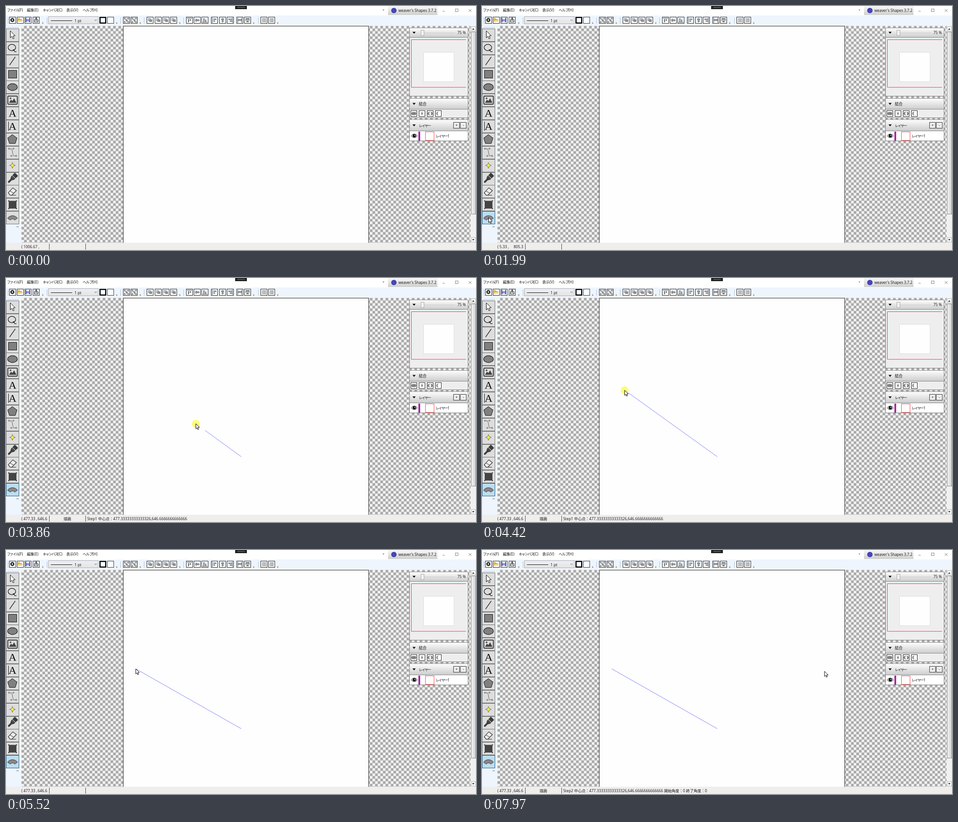
An HTML page with a canvas that plays this animation: 1036x540 px, repeating every 8000 ms.

```html
<!DOCTYPE html>
<html lang="ja">
<head>
<meta charset="utf-8">
<style>
html, body { margin: 0; width: 100%; height: 100%; overflow: hidden; background: #fff; }
canvas { display: block; }
</style>
</head>
<body>
<canvas id="stage" width="1036" height="540"></canvas>
<script>
const LOOP = 8000, STEP = 70;
const SANS = '"Open Sans", "Noto Sans CJK JP", sans-serif';
const stage = document.getElementById('stage').getContext('2d');
const backdrop = document.createElement('canvas');
backdrop.width = 1036;
backdrop.height = 540;
let g = backdrop.getContext('2d');

// Pointer strokes as [time, x, y]
const MOVES = [
  [[290, 906, 522], [430, 740, 506], [640, 415, 490], [780, 260.5, 479], [920, 70, 458], [990, 20, 452], [1050, 11, 468]],
  [[1120, 12, 468], [1260, 14.5, 468]],
  [[1990, 14.5, 468], [2200, 100, 460], [2480, 400, 418], [2620, 510, 398], [2770, 545, 392]],
  [[2900, 541, 393], [3110, 523, 394], [3250, 519, 394], [3440, 516, 394], [3510, 515, 393], [3580, 503, 384], [3650, 481, 368]],
  [[3720, 459, 352], [4000, 378, 293], [4210, 340, 267], [4350, 321, 253], [4420, 314.5, 248.5], [4490, 308.5, 250.5]],
  [[4570, 305, 252], [4850, 293, 259], [4920, 289, 261.5], [5130, 286, 263], [5260, 286, 263]],
  [[6310, 292, 258], [6450, 320, 233], [6590, 352, 205.5], [6800, 373, 187], [7080, 380, 182.5]],
  [[7410, 386, 178], [7550, 450, 140], [7620, 510, 131], [7760, 650, 172], [7900, 742, 246], [7970, 755, 268.5]]
];

function box(x, y, w, h, fill, stroke, width = 1) {
  if (fill) { g.fillStyle = fill; g.fillRect(x, y, w, h); }
  if (stroke) {
    g.strokeStyle = stroke;
    g.lineWidth = width;
    g.strokeRect(x + width / 2, y + width / 2, w - width, h - width);
  }
}

function paint(fill, stroke, width = 1) {
  if (fill) { g.fillStyle = fill; g.fill(); }
  if (stroke) { g.strokeStyle = stroke; g.lineWidth = width; g.stroke(); }
}

function poly(points, fill, stroke, width) {
  g.beginPath();
  points.forEach(([x, y]) => g.lineTo(x, y));
  g.closePath();
  paint(fill, stroke, width);
}

function line(x1, y1, x2, y2, color = '#000', width = 1) {
  g.beginPath();
  g.moveTo(x1, y1);
  g.lineTo(x2, y2);
  paint(null, color, width);
}

function oval(x, y, rx, ry, fill, stroke, width) {
  g.beginPath();
  g.ellipse(x, y, rx, ry, 0, 0, Math.PI * 2);
  paint(fill, stroke, width);
}

// Returns the advance width so that runs can follow each other.
function text(str, x, y, { size = 8.3, color = '#111', gap = 0, align = 'left', family = SANS } = {}) {
  g.font = `${size}px ${family}`;
  g.letterSpacing = gap + 'px';
  g.textAlign = align;
  g.fillStyle = color;
  g.fillText(str, x, y);
  return g.measureText(str).width;
}

function fade(x1, y1, x2, y2, from, to) {
  const ramp = g.createLinearGradient(x1, y1, x2, y2);
  ramp.addColorStop(0, from);
  ramp.addColorStop(1, to);
  return ramp;
}

function pointer(x, y, scale = 1) {
  const shape = [[0, 0], [0, 11.3], [2.6, 9], [4.3, 13], [6.2, 12.2], [4.5, 8.3], [8, 8]];
  poly(shape.map(([a, b]) => [x + a * scale, y + b * scale]), '#fff', '#000', 1);
}

function polar(cx, cy, radii, count) {
  return Array.from({ length: count }, (_, i) => {
    const a = -Math.PI / 2 + i * 2 * Math.PI / count, r = radii[i % radii.length];
    return [cx + r * Math.cos(a), cy + r * Math.sin(a)];
  });
}

function overflowMark(x) {
  line(x - 1.5, 36.5, x + 1.5, 36.5, '#555', .6);
  poly([[x - 1.5, 38], [x + 1.5, 38], [x, 39.6]], '#333');
}

function grip(x) {
  for (let y = 26; y < 39; y += 2) box(x, y, 1, 1, '#7d8da8');
}

const toolY = i => 64 + 28.87 * i;

function fan(y) {
  const a = -Math.PI * .81, b = -Math.PI * .19;
  g.beginPath();
  g.arc(14.3, y + 9, 13.3, a, b);
  g.arc(14.3, y + 9, 5.8, b, a, true);
  g.closePath();
  paint('#888', '#222', .8);
}

function toolButton(i, fill = '#ddd', edge = '#707070') {
  const y = Math.round(toolY(i) - 14);
  box(0, y, 29, 29, fill, edge);
}

const toolIcons = [
  y => pointer(9.5, y - 9, 1.35),
  y => {
    oval(13, y - 1, 8.3, 7, null, '#111', 1.3);
    g.beginPath();
    g.moveTo(15, y + 4);
    g.quadraticCurveTo(18, y + 3, 18, y + 6);
    g.quadraticCurveTo(18, y + 9, 23, y + 8);
    paint(null, '#111', 1.3);
  },
  y => line(8, y + 9, 20.5, y - 9, '#111', 1.3),
  y => box(5, Math.round(y) - 9, 19, 18, '#808080', '#111'),
  y => oval(14.3, y, 10.8, 7.6, '#808080', '#111', 1.1),
  y => {
    g.beginPath();
    g.roundRect(4, y - 9, 21, 18, 2);
    paint('#ddd', '#444', 2.2);
    poly([[6.5, y + 6], [11, y - 1], [14, y + 2], [18, y - 4], [23, y + 6]], '#444');
    oval(10, y - 4, 1.8, 1.8, '#444');
  },
  y => text('A', 14.3, y + 8, { size: 24, align: 'center', family: '"Liberation Serif", serif' }),
  y => {
    line(5.5, y - 10, 5.5, y + 10, '#111', 1);
    text('A', 14.5, y + 8, { size: 24, align: 'center', family: '"Liberation Serif", serif' });
  },
  y => poly(polar(14, y + .5, [10.8], 5), '#808080', '#111', 1),
  y => {
    g.beginPath();
    g.moveTo(6, y - 8);
    g.bezierCurveTo(21, y - 8, 8, y + 8, 22, y + 8);
    paint(null, '#444', .9);
    line(6, y - 8, 17, y - 8, '#777', .6);
    line(12, y + 8, 22, y + 8, '#777', .6);
    [[5, -9.5], [15, -9.5], [10, 6.5], [21, 6.5]].forEach(([x, dy]) => box(x, y + dy, 3, 3, '#eee', '#444', .7));
  },
  y => poly(polar(14.2, y, [6.5, 2.6], 8), '#ffef4a', '#555', .8),
  y => {
    g.save();
    g.translate(14, y);
    g.rotate(Math.PI / 4);
    box(-5, -13, 10, 8, '#3c3c3c');
    box(-5, -4, 10, 3, '#3c3c3c');
    poly([[-5, -1], [5, -1], [2, 4], [-2, 4]], '#3c3c3c');
    g.beginPath();
    g.roundRect(-2, 2, 4, 11, 2);
    paint('#3c3c3c');
    g.restore();
  },
  y => {
    poly([[5, y + 3], [15, y - 8], [23, y - 2], [13, y + 8], [9, y + 8]], '#eee', '#222', 1.1);
    line(9, y - 1, 17, y + 4, '#222', 1);
    line(9, y + 8.3, 22, y + 8.3, '#222', 1);
  },
  y => {
    box(6, y - 8, 17, 17, '#444');
    [[5, -9], [22, -9], [5, 8], [22, 8]].forEach(([x, dy]) => box(x, y + dy, 2, 2, '#222'));
  },
  fan
];

function barIcon(kind, x, y = 31) {
  const grey = '#777';
  const icons = {
    gear() {
      poly(polar(x, y, [5, 5, 3.6, 3.6], 32), '#111');
      oval(x, y, 1.8, 1.8, '#fff');
    },
    folder() {
      poly([[x - 5, y - 4], [x - 1, y - 4], [x, y - 2], [x + 4, y - 2], [x + 4, y + 4], [x - 5, y + 4]], '#d9a63c');
      poly([[x - 3, y], [x + 6, y], [x + 4, y + 4], [x - 5, y + 4]], '#f7d77b');
    },
    disk() {
      box(x - 5, y - 5, 10, 10, '#5757b5', '#333386', .8);
      box(x - 3, y - 5, 6, 4, '#fff');
      box(x - 3, y + 1, 6, 4, '#c8c8e8');
    },
    share() {
      box(x - 4, y - 1, 9, 6, null, '#111', 1.1);
      line(x + .5, y + 2, x + .5, y - 4, '#111', 1.1);
      poly([[x - 2, y - 3], [x + .5, y - 6], [x + 3, y - 3]], '#111');
    },
    group() {
      box(x - 4, y - 4, 9, 9, null, '#999', .8);
      [[-5, -5], [3, -5], [-5, 3], [3, 3]].forEach(([dx, dy]) => box(x + dx, y + dy, 3, 3, '#fff', '#555', .8));
      box(x - 2, y - 2, 4, 3, '#999');
      box(x, y, 3, 3, grey);
    },
    order() { box(x - 4, y - 4, 6, 6, '#ccc', '#777', .8); box(x - 1, y - 1, 6, 5, '#999', '#666', .8); },
    alignH() { line(x - 5, y - 4, x + 6, y - 4, '#333', 1); box(x - 3, y - 2, 2.5, 7, '#777'); box(x + 1, y - 2, 2.5, 4, '#777'); },
    middleH() { line(x - 5, y + .5, x + 6, y + .5, '#333', .8); box(x - 3, y - 3, 2.5, 7, '#777'); box(x + 1, y - 2, 2.5, 5, '#777'); },
    bottomH() { line(x - 5, y + 5, x + 6, y + 5, '#333', 1); box(x - 3, y - 4, 2.5, 8, '#777'); box(x + 1, y - 1, 2.5, 5, '#777'); },
    alignV() { line(x - 4, y - 5, x - 4, y + 6, '#333', 1); box(x - 2, y - 3, 7, 2.5, '#777'); box(x - 2, y + 1, 4, 2.5, '#777'); },
    middleV() { line(x + .5, y - 5, x + .5, y + 6, '#333', .8); box(x - 3, y - 3, 7, 2.5, '#777'); box(x - 2, y + 1, 5, 2.5, '#777'); },
    rightV() { line(x + 5, y - 5, x + 5, y + 6, '#333', 1); box(x - 4, y - 3, 8, 2.5, '#777'); box(x - 1, y + 1, 5, 2.5, '#777'); },
    spreadH() { line(x - 4, y - 5, x - 4, y + 6, '#333'); line(x + 4.5, y - 5, x + 4.5, y + 6, '#333'); line(x - 4, y, x + 4, y, grey, 3); },
    spreadV() { box(x - 4, y - 4, 9, 3, grey); line(x - 5, y + .5, x + 6, y + .5, '#333', .8); box(x - 2, y + 2, 5, 3, grey); },
    clip() { box(x - 4, y - 4, 9, 9, '#ddd', '#999', .8); box(x - 2, y - 3, 6, 7, '#bbb'); }
  };
  box(x - 7, y - 7, 15, 15, '#fff', '#222');
  icons[kind]();
}

function drawTopBars() {
  box(0, 0, 1036, 21, '#fff');
  box(0, 21, 1036, 23, '#eef5fd');
  box(0, 44, 34, 481, '#eef5fd');
  const menus = [['ファイル', 'F', 2, -1.5], ['編集', 'E', 46, 0], ['キャンバス', 'C', 81, -1.4], ['表示', 'V', 133, 0], ['ヘルプ', 'H', 169, -.8]];
  menus.forEach(([label, key, x, gap]) => {
    const width = text(label, x, 11.5, { size: 8, gap });
    text(`(${key})`, x + width, 11.5, { size: 8.3 });
  });

  box(505, 0, 26, 7, '#222');
  box(510, 2, 16, 2, '#555');
  poly([[830, 8], [834, 8], [832, 10]], '#555');
  box(842, 0, 109, 20, fade(0, 0, 0, 20, '#f8f8f8', '#cfcfcf'));
  oval(855, 10, 6, 6, '#4646b8');
  text("weaver's Shapes 3.7.2", 865, 13, { size: 8.2 });
  line(962, 11.5, 967, 11.5, '#888');
  box(990, 6, 7, 7, null, '#888');
  line(1020, 7, 1026, 13, '#888');
  line(1026, 7, 1020, 13, '#888');

  [4, 90, 252, 304, 391, 556].forEach(grip);
  [81, 244, 296, 383, 546, 599].forEach(overflowMark);
  box(93, 23, 111, 17, fade(0, 23, 0, 40, '#f0f0f0', '#e3e3e3'), '#acacac');
  line(99, 32.5, 146, 32.5, '#111');
  text('1 pt', 151, 35.5);
  g.beginPath();
  g.moveTo(195, 30);
  g.lineTo(197.5, 32.5);
  g.lineTo(200, 30);
  paint(null, '#444', .9);

  const icons = [
    ['gear', 14], ['folder', 31], ['disk', 48], ['share', 66], ['group', 265], ['group', 282],
    ['order', 317], ['order', 335], ['order', 352], ['order', 369],
    ['alignH', 404], ['middleH', 421], ['bottomH', 438], ['alignV', 459], ['middleV', 477], ['rightV', 494],
    ['spreadH', 515], ['spreadV', 532], ['clip', 568], ['clip', 585]
  ];
  icons.forEach(([kind, x]) => barIcon(kind, x));
  box(206, 24, 15, 15, '#fff', '#000', 2.5);
  box(223, 24, 15, 15, '#fff', '#333');
}

function drawToolbox() {
  for (let x = 3; x < 28; x += 2) box(x, 47, 1, 1, '#7d8da8');
  toolIcons.forEach((icon, i) => { toolButton(i); icon(toolY(i)); });
  [23.5, 26].forEach(x => {
    g.beginPath();
    g.moveTo(x, 487);
    g.lineTo(x + 1.5, 488.5);
    g.lineTo(x, 490);
    paint(null, '#333', .7);
  });
}

function drawWorkspace() {
  const cell = 5.774;
  box(34, 44, 990, 481, '#f2f2f2');
  g.save();
  g.beginPath();
  g.rect(34, 44, 990, 481);
  g.clip();
  g.fillStyle = '#a9a9a9';
  for (let row = 0; row < 84; row++)
    for (let col = (row + 1) % 2; col < 172; col += 2) g.fillRect(34.1 + col * cell, 44.1 + row * cell, cell, cell);
  g.restore();
  box(258, 44, 542, 490, '#fefefe', '#222');

  box(1024, 44, 12, 481, '#f0f0f0');
  box(1025, 45, 11, 11, '#f4f4f4', '#bbb');
  box(1025, 57, 11, 404, fade(1025, 0, 1036, 0, '#f5f5f5', '#cfcfcf'), '#888');
  box(1025, 512, 11, 11, '#f4f4f4', '#bbb');
  poly([[1027.5, 52.5], [1032.5, 52.5], [1030, 49.5]], '#222');
  poly([[1027.5, 516], [1032.5, 516], [1030, 519]], '#222');
}

function panel(y, header, height, body) {
  box(889, y, 130, height, body, '#777');
  box(889, y, 130, header, fade(0, y, 0, y + header, '#fff', '#cbcbcb'), '#888');
  const m = y + header / 2;
  poly([[896, m - 2], [903, m - 2], [899.5, m + 2.5]], '#111');
}

function drawPanels() {
  panel(48, 22, 152, '#eee');
  line(922, 59.5, 990, 59.5, '#ccc');
  box(914, 53, 8, 13, '#f0f0f0', '#aaa');
  text('75 %', 1013.5, 62, { align: 'right' });
  g.beginPath();
  g.moveTo(1014, 74.5);
  g.lineTo(893.5, 74.5);
  g.lineTo(893.5, 180);
  g.lineTo(1014, 180);
  paint(null, '#f33', 1);
  box(920, 102, 68, 66, '#fefefe', '#ddd');

  panel(204, 25, 44, '#eee');
  text('結合', 910, 220, { size: 8.6 });
  [892, 910, 928, 946].forEach(x => box(x, 231, 14, 14, '#fff', '#222'));
  oval(897, 238, 3.4, 3.6, '#808080');
  oval(901, 238, 3.4, 3.6, '#808080');
  poly([[917, 234], [919, 238], [917, 242], [915, 238]], '#808080');
  oval(933, 238, 3.6, 3.8, '#808080');
  oval(937, 238, 3.6, 3.8, '#808080');
  oval(935, 238, 2, 3.6, '#fff');
  oval(952, 238, 3.6, 3.8, '#808080');
  oval(955, 238, 3.8, 3.8, '#fff');

  panel(251, 26, 48, '#fff');
  text('レイヤー', 910, 268, { size: 8, gap: -1.5 });
  [['+', 986], ['-', 1001]].forEach(([sign, x]) => {
    box(x, 257, 14, 14, '#eee', '#333');
    text(sign, x + 7, 267, { align: 'center' });
  });
  g.beginPath();
  g.moveTo(893, 287.5);
  g.quadraticCurveTo(900, 279, 907, 287.5);
  g.quadraticCurveTo(900, 295, 893, 287.5);
  paint('#fff', '#111', 1);
  oval(900, 287, 3.7, 3.7, '#111');
  oval(901, 286, 1, 1, '#fff');
  box(909, 278, 4, 20, '#a0309c');
  box(924, 278, 20, 20, '#fff', '#f44');
  const width = text('レイヤー', 947, 291, { size: 8, gap: -1.5 });
  text('1', 947 + width, 291);
}

function drawStatusBar() {
  box(0, 524, 1036, 16, '#f0eded');
  line(95.5, 526, 95.5, 539, '#444');
  line(175.5, 526, 175.5, 539, '#444');
}

function pointerAt(t) {
  const move = MOVES.findLast(m => t >= m[0][0]);
  if (!move) return null;
  const start = move[0][0], end = move[move.length - 1];
  if (t >= end[0]) return end.slice(1);
  const held = start + Math.floor((t - start + .5) / STEP) * STEP;
  const i = move.findIndex(k => k[0] > held);
  if (i < 0) return end.slice(1);
  const [t0, x0, y0] = move[i - 1], [t1, x1, y1] = move[i];
  const f = (held - t0) / (t1 - t0);
  return [x0 + (x1 - x0) * f, y0 + (y1 - y0) * f];
}

const snap = v => Math.round(v * .75) / .75;

function coordinates(t, at) {
  if (t >= 3440) return ['477.33', '646.6'];
  if (!at || at[0] > 801) return ['1006.67', ''];
  if (at[0] < 258) return ['5.33', '805.3'];
  const x = snap((at[0] - 257.5) / .54), y = snap((at[1] - 44.9) / .54);
  return [String(+x.toFixed(2)), y.toFixed(3).slice(0, 5)];
}

function drawStatus(t, at) {
  const [x, y] = coordinates(t, at);
  text(`( ${x} ,`, 34, 536);
  text(y, 91, 536, { align: 'right' });
  const step = t >= 6310 ? 2 : t >= 3510 && t < 5520 ? 1 : 0;
  if (!step) return;
  const angles = step === 2 ? ' 開始角度：0 終了角度：0' : '';
  text('描画', 127, 536);
  text(`Step${step} 中心点：477.33333333333326,646.6666666666666${angles}`, 179, 536);
}

function render(t) {
  g.drawImage(backdrop, 0, 0);
  const at = pointerAt(t);
  const checked = t >= 1660;
  const hover = at && at[0] < 29 && at[1] > 454 && at[1] < 483;
  if (checked || hover) {
    toolButton(14, checked ? '#bcddee' : '#bee6fd', checked ? '#245a83' : '#3c7fb1');
    fan(toolY(14));
  }
  drawStatus(t, at);
  if (t >= 3510) {
    // The rubber band trails the pointer by one step until the drag ends.
    const [x, y] = t >= 5260 ? [286, 263] : pointerAt(Math.max(3510, t - STEP));
    line(x, y, 518.5, 395.5, '#00f', .5);
  }
  if (!at) return;
  const pressed = t >= 1520 && t < 1660 || t >= 3440 && t < 5520;
  if (pressed) oval(at[0], at[1], 8.7, 8.7, 'rgba(255,250,0,.52)');
  pointer(at[0], at[1]);
}

drawTopBars();
drawWorkspace();
drawToolbox();
drawPanels();
drawStatusBar();
g = stage;

const begin = performance.now();
function tick() {
  render((performance.now() - begin) % LOOP);
  requestAnimationFrame(tick);
}
tick();
</script>
</body>
</html>
```
